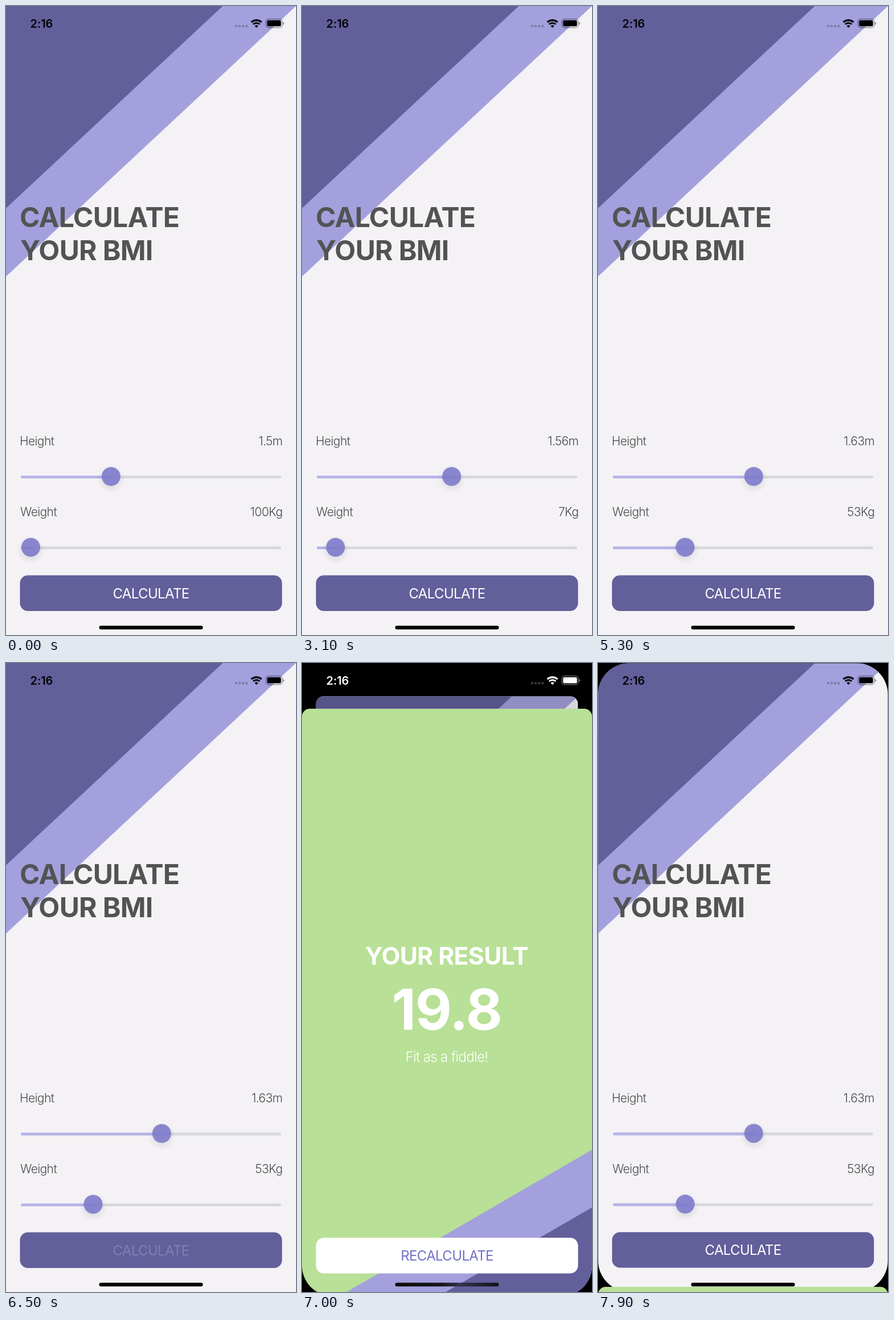
Animation, 509 px wide and 1101 px high, one loop 8000 ms. Source, as an HTML page:

```html
<!DOCTYPE html>
<html lang="en">
<head>
<meta charset="utf-8">
<title>BMI calculator</title>
<style>
  html, body { margin: 0; width: 100%; height: 100%; overflow: hidden; background: #000; }
  svg { display: block; width: 100%; height: 100%; }
  text { font-family: Inter, sans-serif; white-space: pre; }
  .bold { font-weight: 700; letter-spacing: -.014em; }
  .title { font-size: 48px; fill: #535354; }
  .label { font-size: 21px; font-weight: 300; letter-spacing: -.028em; fill: #4b4b4d; }
  .action { font-size: 24px; letter-spacing: -.027em; }
  .mid { text-anchor: middle; }
  .end { text-anchor: end; }
  .dark { fill: #625f9b; }
  .pale { fill: #a3a0dd; }
  .track { stroke: #d9d8dc; stroke-width: 5; stroke-linecap: round; }
  .fill { stroke: #b6b6e8; stroke-width: 5; stroke-linecap: round; }
  .thumb { fill: #7d79cc; fill-opacity: .88; }
</style>
</head>
<body>
<svg viewBox="0 0 509 1101" preserveAspectRatio="none">
  <defs>
    <clipPath id="cardClip"><rect id="cardShape" width="509" height="1101"/></clipPath>
    <clipPath id="sheetClip"><path id="sheetShape"/></clipPath>
    <radialGradient id="shade">
      <stop offset=".45" stop-opacity=".075"/>
      <stop offset="1" stop-opacity="0"/>
    </radialGradient>
    <linearGradient id="barFade">
      <stop offset="0" stop-color="#0c0c0c"/>
      <stop offset=".45" stop-color="#161616"/>
      <stop offset=".62" stop-color="#35334c"/>
      <stop offset="1" stop-color="#121218"/>
    </linearGradient>
    <g id="knob">
      <circle cy="5" r="25" fill="url(#shade)"/>
      <circle class="thumb" r="16.6"/>
    </g>
  </defs>
  <rect width="509" height="1101"/>

  <g id="card"><g clip-path="url(#cardClip)">
    <rect width="509" height="1101" fill="#f4f2f5"/>
    <path class="pale" d="M0 0H509L0 473.5Z"/>
    <path class="dark" d="M0 0H380.5L0 354Z"/>
    <text class="bold title" x="24" y="387">CALCULATE</text>
    <text class="bold title" x="25" y="445">YOUR BMI</text>

    <text class="label" x="24" y="769">Height</text>
    <text class="label end" id="heightText" x="485.3" y="769"></text>
    <path class="track" d="M28.5 824.5H480.5"/>
    <line class="fill" id="heightFill" x1="28.5" y1="824.5" y2="824.5"/>
    <use href="#knob" id="heightKnob" y="823.5"/>

    <text class="label" x="25" y="893">Weight</text>
    <text class="label end" id="weightText" x="485.3" y="893"></text>
    <path class="track" d="M28.5 948.5H480.5"/>
    <line class="fill" id="weightFill" x1="28.5" y1="948.5" y2="948.5"/>
    <use href="#knob" id="weightKnob" y="947.5"/>

    <rect class="dark" x="24.5" y="996.5" width="460" height="62.5" rx="14"/>
    <text class="action mid" id="calc" x="254.5" y="1036.5" fill="#fff">CALCULATE</text>
    <rect id="dim" width="509" height="1101"/>
  </g></g>

  <g id="sheet"><g clip-path="url(#sheetClip)">
    <rect width="509" height="1028" fill="#b8e096"/>
    <path class="pale" d="M509 772V1028H66Z"/>
    <path class="dark" d="M509 873V1028H240Z"/>
    <g class="mid" fill="#fff">
      <text class="bold" x="254" y="448" font-size="42.6">YOUR RESULT</text>
      <text class="bold" x="254" y="562" font-size="99">19.8</text>
      <text x="254" y="618" font-size="24" font-weight="300" letter-spacing="-.62">Fit as a fiddle!</text>
    </g>
    <rect x="24.5" y="926" width="460" height="62.5" rx="14" fill="#fff"/>
    <text class="action mid" id="recalc" x="254.5" y="966" fill="#7571c9">RECALCULATE</text>
  </g></g>

  <g id="status">
    <text x="42.6" y="37.5" font-size="20" font-weight="600" letter-spacing="-.1">2:16</text>
    <path d="M404 35.3h.01m6.1 0h.01m6.1 0h.01m6.1 0h.01" stroke="currentColor" stroke-width="4.6" stroke-linecap="round" opacity=".22"/>
    <g fill="none" stroke="currentColor">
      <path d="M430.6 28.4a13.2 13.2 0 0 1 18 0" stroke-width="3.2"/>
      <path d="M433.8 32a8.3 8.3 0 0 1 11.6 0" stroke-width="3"/>
      <rect x="456.2" y="22.8" width="28.6" height="15" rx="4.4" stroke-width="1.3" opacity=".45"/>
    </g>
    <path d="M439.6 38.2l-3.1-3.2a4.6 4.6 0 0 1 6.2 0Z"/>
    <rect x="458.3" y="25" width="24.4" height="10.6" rx="2.6"/>
    <path d="M486.3 28v5q1.9-.6 1.9-2.5t-1.9-2.5" opacity=".5"/>
  </g>
  <rect id="homeBar" x="163.5" y="1084.7" width="182" height="6.6" rx="3.3"/>
</svg>
<script>
const LOOP = 8000, STEP = 100;
const REST_TOP = 73, STAGE_H = 1101, STAGE_W = 509;
const $ = id => document.getElementById(id);
const set = (id, attrs) => {
  for (const k in attrs) $(id).setAttribute(k, attrs[k]);
};
const clamp = v => Math.min(1, Math.max(0, v));
const ease = (t, from, to) => {
  const k = clamp((t - from) / (to - from));
  return k * k * (3 - 2 * k);
};

// Remaining distance of a critically damped spring released at `start`.
const spring = (t, start) => {
  const k = 18.33 * Math.max(0, t - start) / 1000;
  return (1 + k) * Math.exp(-k);
};

function presented(t) {
  if (t >= 7529.6) return spring(t, 7529.6);
  return t >= 7200 ? 1 : 1 - spring(t, 6614);
}

function slider(name, x, label) {
  set(name + 'Knob', { x });
  set(name + 'Fill', { x2: x });
  $(name + 'Text').textContent = label;
}

function sheetPath(r, b) {
  const w = STAGE_W, h = STAGE_H - REST_TOP;
  return `M0 ${r}A${r} ${r} 0 0 1 ${r} 0H${w - r}A${r} ${r} 0 0 1 ${w} ${r}` +
    `V${h - b}A${b} ${b} 0 0 1 ${w - b} ${h}H${b}A${b} ${b} 0 0 1 0 ${h - b}Z`;
}

function draw(t) {
  const height = 1 + .556 * ease(t, 700, 1600) + .076 * ease(t, 5000, 5300);
  slider('height', 43.5 + height / 3 * 422.5, (t < 800 ? '1.5' : height.toFixed(2)) + 'm');

  const w = ease(t, 2700, 4400);
  slider('weight', 43.5 + 109.5 * w, (t < 2800 ? 100 : Math.round(53 * w)) + 'Kg');

  set('calc', { opacity: t < 6500 || t >= 6700 ? 1 : t < 6600 ? .2 : .6 });
  set('recalc', { opacity: t >= 7400 && t < 7600 ? .2 : 1 });

  const p = presented(t), inset = 24.7 * p;
  const scale = 1 - 2 * inset / STAGE_W;
  set('card', { transform: `translate(${inset} ${58.7 * p}) scale(${scale})` });
  set('cardShape', { rx: p > 0 ? 55 - 40 * p : 0 });
  set('dim', { opacity: .12 * p });

  const top = REST_TOP + (1 - p) * (STAGE_H - REST_TOP);
  set('sheet', { transform: `translate(0 ${top})`, visibility: p > 0 ? 'visible' : 'hidden' });
  set('sheetShape', { d: sheetPath(13.6, p === 1 ? 0 : 53) });

  const tone = Math.round(255 * clamp((p - .2) / .4));
  const ink = `rgb(${tone},${tone},${tone})`;
  set('status', { fill: ink, color: ink });
  set('homeBar', { fill: p > .98 ? 'url(#barFade)' : '#000' });
}

function tick() {
  const t = performance.now() % LOOP;
  draw(Math.floor(t / STEP) * STEP);
  requestAnimationFrame(tick);
}
tick();
</script>
</body>
</html>
```
